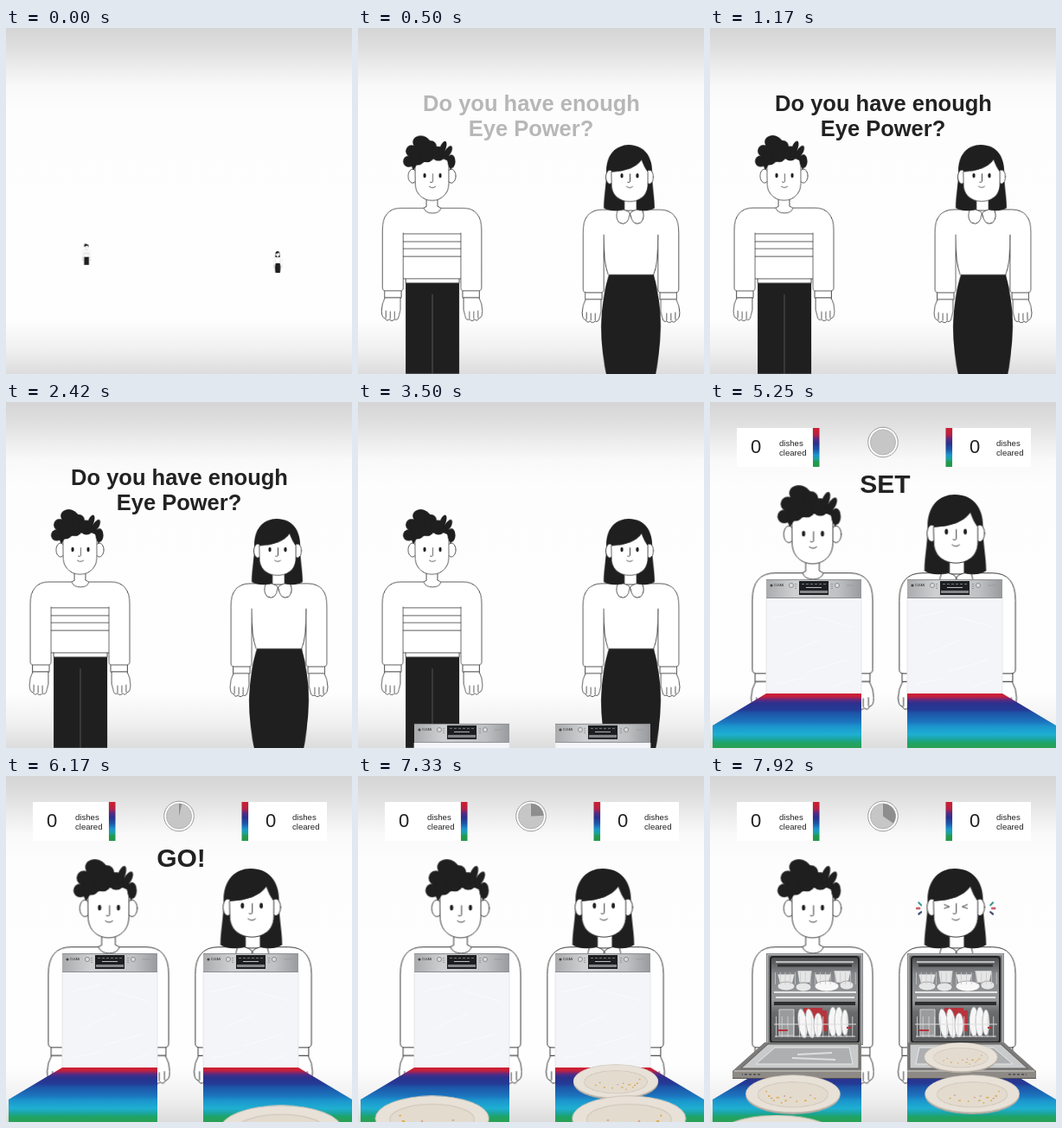
Recreate the animation shown at these times as an HTML page without scripts. Size 400 by 400 pixels, loop 8000 ms.

```html
<!DOCTYPE html>
<html lang="en">
<head>
<meta charset="utf-8">
<title>Eye Power</title>
<style>
html, body { margin: 0; width: 100%; height: 100%; overflow: hidden; background: #fff; }
svg { display: block; width: 100vw; height: 100vh; }
text { font-family: "Liberation Sans", Arial, sans-serif; fill: #222; }
.big { font-weight: 700; text-anchor: middle; }
.num { font-size: 22px; text-anchor: middle; }
.small { font-size: 9.6px; }
.line { fill: #fff; stroke: #333; stroke-width: .8; stroke-linecap: round; stroke-linejoin: round; }
.open { fill: none; }
.ink { fill: #1f1f1f; }

.man, .woman, .title, .washer, .mat, .ui, .word, .pie, .plate, .plates,
.front, .door, .inside, .eyes, .squint { animation: 8s linear infinite; }

.man { animation-name: man; }
@keyframes man {
  0%, 1% { transform: translate(85.3px, 238px) scale(.09); animation-timing-function: cubic-bezier(.2,.8,.3,1); }
  7% { transform: none; }
  44% { transform: translate(0px, 0px) scale(1); animation-timing-function: ease-in-out; }
  49.5%, 100% { transform: translate(15px, -54px) scale(1.21); }
}
.woman { animation-name: woman; }
@keyframes woman {
  0%, 1% { transform: translate(284.8px, 245.4px) scale(.093); animation-timing-function: cubic-bezier(.2,.8,.3,1); }
  7% { transform: none; }
  44% { transform: translate(0px, 0px) scale(1); animation-timing-function: ease-in-out; }
  49.5%, 100% { transform: translate(-95.8px, -56.4px) scale(1.21); }
}
.title { animation-name: title; }
@keyframes title {
  0%, 5% { opacity: 0; transform: none; }
  9%, 37% { opacity: 1; transform: none; }
  41%, 100% { opacity: 0; transform: translateY(-14px); }
}
.washer { animation-name: rise; }
@keyframes rise {
  0%, 41.8% { transform: translateY(200px); animation-timing-function: ease-in-out; }
  48.75%, 100% { transform: none; }
}
.mat { transform-origin: 0 337px; animation-name: unroll; }
@keyframes unroll {
  0%, 48.5% { transform: scaleY(0); animation-timing-function: ease-out; }
  52%, 100% { transform: none; }
}
.ui { animation-name: ui; }
@keyframes ui { 0%, 48.5% { opacity: 0; } 51.5%, 100% { opacity: 1; } }

.word { font-size: 30px; animation-timing-function: step-end; }
.ready { animation-name: ready; }
.set { animation-name: set; }
.go { animation-name: go; }
@keyframes ready { 0%, 62% { opacity: 0; } 51.5% { opacity: 1; } }
@keyframes set { 0%, 73% { opacity: 0; } 62% { opacity: 1; } }
@keyframes go { 0%, 83.5% { opacity: 0; } 73% { opacity: 1; } }

.pie { fill: none; stroke: #8e8e8e; stroke-width: 14.6; animation-name: pie; }
@keyframes pie {
  0%, 74.5% { stroke-dasharray: 0 360; }
  100% { stroke-dasharray: 130 360; }
}

.plates { animation-name: serve; animation-timing-function: step-end; }
@keyframes serve { 0% { opacity: 0; } 70.5%, 100% { opacity: 1; } }
.plate { animation-name: slide; animation-fill-mode: backwards; }
.second { animation-delay: .89s; }
.third { animation-delay: 2s; }
@keyframes slide {
  0%, 70.9% { transform: translate(325px, 434px) scale(1.25); }
  77.1% { transform: translate(318px, 409px) scale(1.14); }
  91.6% { transform: translate(298px, 353px) scale(.79); }
  99% { transform: translate(290px, 325px) scale(.68); }
  100% { transform: translate(289px, 322px) scale(.67); }
}

.front { transform-origin: 0 337px; animation-name: drop; }
@keyframes drop {
  0%, 95% { transform: none; animation-timing-function: ease-in; }
  97%, 100% { transform: scaleY(0); }
}
.door { transform-origin: 0 308px; animation-name: door; }
@keyframes door {
  0%, 96% { transform: scaleY(0); animation-timing-function: ease-out; }
  98%, 100% { transform: none; }
}
.inside { animation-name: inside; animation-timing-function: step-end; }
@keyframes inside { 0% { opacity: 0; } 95%, 100% { opacity: 1; } }
.eyes { animation-name: eyes; animation-timing-function: step-end; }
@keyframes eyes { 0% { opacity: 1; } 97.8%, 100% { opacity: 0; } }
.squint { animation-name: squint; animation-timing-function: step-end; }
@keyframes squint { 0% { opacity: 0; } 97.8%, 100% { opacity: 1; } }
</style>
</head>
<body>
<svg viewBox="0 0 400 400">
<defs>
  <linearGradient id="wall" x2="0" y2="1">
    <stop offset="0" stop-color="#d5d5d5"/><stop offset=".06" stop-color="#dfdfdf"/>
    <stop offset=".12" stop-color="#eee"/><stop offset=".17" stop-color="#f9f9f9"/>
    <stop offset=".24" stop-color="#fdfdfd"/><stop offset=".84" stop-color="#fefefe"/>
    <stop offset=".93" stop-color="#f0f0f0"/><stop offset="1" stop-color="#dcdcdc"/>
  </linearGradient>
  <linearGradient id="rainbow" x2="0" y2="1">
    <stop offset="0" stop-color="#d0202f"/><stop offset=".06" stop-color="#c02040"/>
    <stop offset=".12" stop-color="#5c2a80"/><stop offset=".18" stop-color="#2b318c"/>
    <stop offset=".3" stop-color="#243a96"/><stop offset=".36" stop-color="#1d55a8"/>
    <stop offset=".52" stop-color="#1c74be"/><stop offset=".6" stop-color="#1b94cd"/>
    <stop offset=".75" stop-color="#1fafd2"/><stop offset=".83" stop-color="#1ba6a4"/>
    <stop offset=".9" stop-color="#1ea368"/><stop offset="1" stop-color="#2aa052"/>
  </linearGradient>
  <linearGradient id="strip" x2="0" y2="1">
    <stop offset="0" stop-color="#cf2030"/><stop offset=".18" stop-color="#b52045"/>
    <stop offset=".28" stop-color="#5c2a80"/><stop offset=".4" stop-color="#2b318c"/>
    <stop offset=".55" stop-color="#1d55a8"/><stop offset=".7" stop-color="#1b97cd"/>
    <stop offset=".8" stop-color="#1ba39a"/><stop offset=".88" stop-color="#239a4c"/>
  </linearGradient>
  <linearGradient id="steel">
    <stop offset="0" stop-color="#a9abad"/><stop offset=".3" stop-color="#cfd0d1"/>
    <stop offset=".75" stop-color="#c0c1c3"/><stop offset="1" stop-color="#989a9d"/>
  </linearGradient>
  <linearGradient id="cavity" x2="0" y2="1">
    <stop offset="0" stop-color="#4a4b4d"/><stop offset=".2" stop-color="#85878a"/>
    <stop offset=".5" stop-color="#98999b"/><stop offset=".65" stop-color="#6a6b6d"/>
    <stop offset="1" stop-color="#5a5b5d"/>
  </linearGradient>

  <g id="plate">
    <ellipse cy="2" rx="62" ry="25" fill="#b5aca2"/>
    <ellipse rx="62" ry="24.5" fill="#e8e1d8" stroke="#cbc2b7" stroke-width=".8"/>
    <ellipse cy="1" rx="46" ry="16.5" fill="#e4dbcf" stroke="#d0c6ba"/>
    <path d="M-30 6h2M-18 9h3M-6 10h2M8 9h3M18 5h4M24 9h2M30 3h3M14 12h2M34 -3h2" stroke="#dba93f" stroke-width="1.6"/>
    <path d="M-24 2h2M2 5h2M27 6h2M10 3h2" stroke="#c98a62" stroke-width="1.2"/>
  </g>

  <g id="arm">
    <path class="line" d="M31 303H50V312H31z"/>
    <path class="line" d="M31 312Q27 319 27 327Q27 335 31 335.500Q33 340 36 337Q39 340 42 337Q46 339 47 333L49 326V312z"/>
    <path class="line open" d="M32 335v-8M37 336v-8M42 336v-8"/>
    <path class="line" d="M52 237V300Q52 304 49 304H32Q28 304 28 300V234Q28 208 50 208H79"/>
  </g>

  <g id="face">
    <ellipse class="ink" cx="-9" rx="1.6" ry="2.700"/>
    <ellipse class="ink" cx="9" rx="1.6" ry="2.700"/>
  </g>
  <path id="nose" class="line open" d="M.5 -2V7q-1 1.500-3 .5M-3.500 12.500q3.500 3 7 0"/>

  <g id="cavityView">
    <rect x="65" y="205" width="112" height="106" fill="#77787a"/>
    <path d="M66.500 310V206.500H175.500V310" fill="none" stroke="#b4b5b7" stroke-width="1.5"/>
    <rect x="70" y="209" width="102" height="99" rx="3" fill="url(#cavity)" stroke="#222" stroke-width="2"/>
    <path d="M76 215H166" stroke="#ddd" stroke-width="1.500"/>
    <path d="M78 219H164" stroke="#333" stroke-width="3"/>
    <g fill="#e6e6e6" stroke="#77797c" stroke-width=".6">
      <path d="M78 229h20l-3 12h-14zM101 225h17l-2 14h-13zM121 229h19l-3 11h-13zM143 225h20l-3 14h-14z"/>
      <ellipse cx="88" cy="243" rx="10" ry="5"/><ellipse cx="108" cy="244" rx="9" ry="5"/>
      <ellipse cx="135" cy="243" rx="14" ry="6" fill="#f8f8f8"/><ellipse cx="158" cy="242" rx="8" ry="5"/>
    </g>
    <path d="M75 234H169" stroke="#c9c9c9" stroke-width="14" stroke-dasharray=".8 5"/>
    <path d="M74 250H169M76 256H167" stroke="#e6e6e6" stroke-width="2"/>
    <path d="M74 263H168" stroke="#2d2e30" stroke-width="4"/>
    <path d="M108 268h22v12h-22z" fill="#b8343c"/>
    <path d="M80 270h17v30H80z" fill="#9a9b9d" stroke="#d0d0d0"/>
    <g fill="#f6f6f6" stroke="#a0a2a4" stroke-width=".7">
      <ellipse cx="107" cy="286" rx="5" ry="17" transform="rotate(-8 107 286)"/>
      <ellipse cx="116" cy="286" rx="5" ry="17" transform="rotate(-8 116 286)"/>
      <ellipse cx="125" cy="288" rx="5" ry="14"/>
      <ellipse cx="142" cy="284" rx="5" ry="17"/>
      <ellipse cx="149" cy="284" rx="5" ry="17"/>
      <ellipse cx="156" cy="285" rx="4" ry="15"/>
    </g>
    <path d="M130 271h5v24h-5z" fill="#b8343c"/>
    <path d="M76 290H167" stroke="#d8d8d8" stroke-width="24" stroke-dasharray=".8 6"/>
    <path d="M74 287H169M75 301H168" stroke="#e0e0e0" stroke-width="1.2"/>
    <path d="M78 294h12M158 291h5" stroke="#b8343c" stroke-width="2"/>
  </g>

  <g id="frontView">
    <path d="M65 227H175V337H65z" fill="#f4f5f8"/>
    <path d="M72 250l38-9M88 292l40-18M112 312l46-14M120 248l44 12M76 326l34-7M140 330l24-9" stroke="#fbfbfd"/>
    <path d="M65 227V337M175 227V337" stroke="#e2e3e7" stroke-width=".8"/>
    <path d="M65 205H175V227H65z" fill="url(#steel)"/>
    <path d="M65 205.500H175M65 226.500H175" stroke="#8c8e90"/>
    <path d="M103 207H137V223H103z" fill="#1d1e20"/>
    <path d="M104 219.500H136" stroke="#85888b" stroke-width="3"/>
    <path d="M106 210.500H134" stroke="#74777a" stroke-dasharray="3 2"/>
    <path d="M111 214.500H129" stroke="#b9bdc0"/>
    <g fill="#dfe0e1" stroke="#77797c" stroke-width=".8"><circle cx="94" cy="212" r="2.500"/><circle cx="147" cy="212" r="2.500"/></g>
    <path d="M99 210v6M141 210v6" stroke="#666" stroke-dasharray="1 1.500"/>
    <path d="M158 212h9" stroke="#999" stroke-width=".8"/>
    <circle cx="71" cy="212" r="1.600" fill="#444"/>
    <text x="74" y="213.300" font-size="3.400">CLEAN</text>
  </g>

  <path id="matView" d="M228 337H338L400 374V400H228z" fill="url(#rainbow)"/>

  <g id="doorView">
    <path d="M228 308H340L377 341V350H228z" fill="#7d7c7a"/>
    <path d="M231 310H336L367 338H231z" fill="#c9cacb" stroke="#4c4c4c" stroke-width=".8"/>
    <path d="M242 314H328L350 333H238z" fill="#aeafb1" stroke="#e8e8e8"/>
    <path d="M262 320l40 2M258 328l50-2" stroke="#dedede" stroke-width="2"/>
    <path d="M228 341H376L377 350H228z" fill="#8d8a86"/>
    <path d="M228 341H375" stroke="#d6d4d1"/>
    <path d="M228 349.500H377" stroke="#55524f"/>
    <path d="M345 345H366" stroke="#4c4c4c" stroke-width="1.500" stroke-dasharray="3 2"/>
  </g>
</defs>

<rect width="400" height="400" fill="url(#wall)"/>

<g class="man">
  <path class="ink" d="M55 294H117V400H55z"/>
  <path d="M86 308V400" stroke="#777" stroke-width=".7"/>
  <path d="M52 209H119V290L117 295H55L52 290z" fill="#fff"/>
  <use href="#arm"/>
  <use href="#arm" transform="matrix(-1 0 0 1 171 0)"/>
  <path class="line open" d="M55 290V295H117V290M52 290H119M52 238H119M52 247H119M52 255H119M52 264H119"/>
  <path class="line" d="M76 208Q78 214 86 214Q94 214 96 208L92 206V194H79V206z"/>
  <ellipse class="line" cx="63" cy="171" rx="5" ry="8"/>
  <ellipse class="line" cx="108" cy="171" rx="5" ry="8"/>
  <path class="line" d="M66 150H105V179C105 206 66 206 66 179z"/>
  <g class="ink">
    <path d="M62 142L74 130L90 136L104 146L111 155L107 164L103 153L96 150L84 152L68 158L64 164L58 152z"/>
    <ellipse cx="74" cy="133" rx="11" ry="8.500" transform="rotate(20 74 133)"/>
    <circle cx="62" cy="142" r="7"/><circle cx="58.500" cy="154" r="6.500"/>
    <circle cx="69" cy="151" r="7.500"/><circle cx="84" cy="137" r="7"/>
    <circle cx="80" cy="147" r="8"/><circle cx="93" cy="145" r="8.500"/>
    <ellipse cx="98" cy="139" rx="3.500" ry="9" transform="rotate(20 98 139)"/>
    <ellipse cx="104" cy="143" rx="3.500" ry="8" transform="rotate(30 104 143)"/>
    <ellipse cx="108" cy="154" rx="4.500" ry="8"/>
  </g>
  <use href="#face" x="86" y="170.500"/>
  <use href="#nose" x="86" y="170.500"/>
</g>

<g class="woman">
  <path d="M284 211H347V270L342 286H290L284 270z" fill="#fff"/>
  <use href="#arm" transform="translate(232 2)"/>
  <use href="#arm" transform="matrix(-1 0 0 1 399 2)"/>
  <path class="line open" d="M284 240Q284 272 289 285M347 240Q347 272 342 285"/>
  <path class="ink" d="M290 285H342Q350 315 350 345Q349 380 343 406H288Q281 375 281 345Q282 310 290 285z"/>
  <path class="ink" d="M284 208C284 194 287 184 287 165C287 146 298 135 313 135C330 135 340 147 340 165C340 184 343 194 343 208Q336 212 328 211H300Q291 212 284 208z"/>
  <path class="line" d="M308 195H322V211H308z"/>
  <path class="line" d="M314.500 214Q312 211 307 210L300 211Q297 219 302 225Q312 230 314.500 214Q317 230 327 225Q332 219 329 211L322 210Q317 211 314.500 214z"/>
  <ellipse class="line" cx="291" cy="172" rx="4.500" ry="8"/>
  <ellipse class="line" cx="337" cy="172" rx="4.500" ry="8"/>
  <path class="line" d="M293 166Q319 165 328 152Q331 161 335 166V181C335 207 293 207 293 181z"/>
  <g class="eyes"><use href="#face" x="314" y="170.500"/></g>
  <use href="#nose" x="314" y="170.500"/>
  <g class="squint" fill="none" stroke-linecap="round">
    <path d="M303 169.500l5 2-5 1.500M325 169.500l-5 2 5 1.500" stroke="#333" stroke-width=".8"/>
    <g id="sparks" stroke-width="1.600">
      <path d="M278.500 167.500l2.500 2.500" stroke="#1a8a7a"/><path d="M276.500 173h3" stroke="#b8283c"/><path d="M278.500 178.500l2.500-2" stroke="#2b3560"/>
    </g>
    <use href="#sparks" transform="matrix(-1 0 0 1 628 0)"/>
  </g>
</g>

<g class="mat">
  <use href="#matView"/>
  <use href="#matView" transform="matrix(-1 0 0 1 403 0)"/>
</g>

<g class="washer">
  <g class="inside">
    <use href="#cavityView"/>
    <use href="#cavityView" x="163"/>
  </g>
  <g class="front">
    <use href="#frontView"/>
    <use href="#frontView" x="163"/>
  </g>
  <g class="door">
    <use href="#doorView"/>
    <use href="#doorView" transform="matrix(-1 0 0 1 403 0)"/>
  </g>
</g>

<g class="plates">
  <use class="plate" href="#plate"/>
  <use class="plate second" href="#plate"/>
  <g transform="matrix(-1 0 0 1 399 0)">
    <use class="plate second" href="#plate"/>
    <use class="plate third" href="#plate"/>
  </g>
</g>

<g class="big title" font-size="25.500">
  <text x="200.500" y="96">Do you have enough</text>
  <text x="200" y="125">Eye Power?</text>
</g>

<g class="ui">
  <path d="M31 30H118V75H31zM281 30H371V75H281z" fill="#fff"/>
  <rect x="119" y="30" width="7.500" height="45" fill="url(#strip)"/>
  <rect x="272.500" y="30" width="7.500" height="45" fill="url(#strip)"/>
  <text class="num" x="53" y="58.500">0</text>
  <text class="num" x="306" y="58.500">0</text>
  <g class="small">
    <text x="80" y="51">dishes</text><text x="80" y="62">cleared</text>
    <text x="331" y="51">dishes</text><text x="331" y="62">cleared</text>
  </g>
  <circle cx="200" cy="46.500" r="17.300" fill="#fff" stroke="#999"/>
  <circle cx="200" cy="46.500" r="14.600" fill="#c6c6c6" stroke="#aaa" stroke-width=".8"/>
  <circle class="pie" cx="200" cy="46.500" r="7.300" pathLength="360" transform="rotate(-90 200 46.500)"/>
</g>

<text class="big word ready" x="202.500" y="104.500">READY</text>
<text class="big word set" x="202.500" y="104.500">SET</text>
<text class="big word go" x="202.500" y="104.500">GO!</text>
</svg>
</body>
</html>
```
